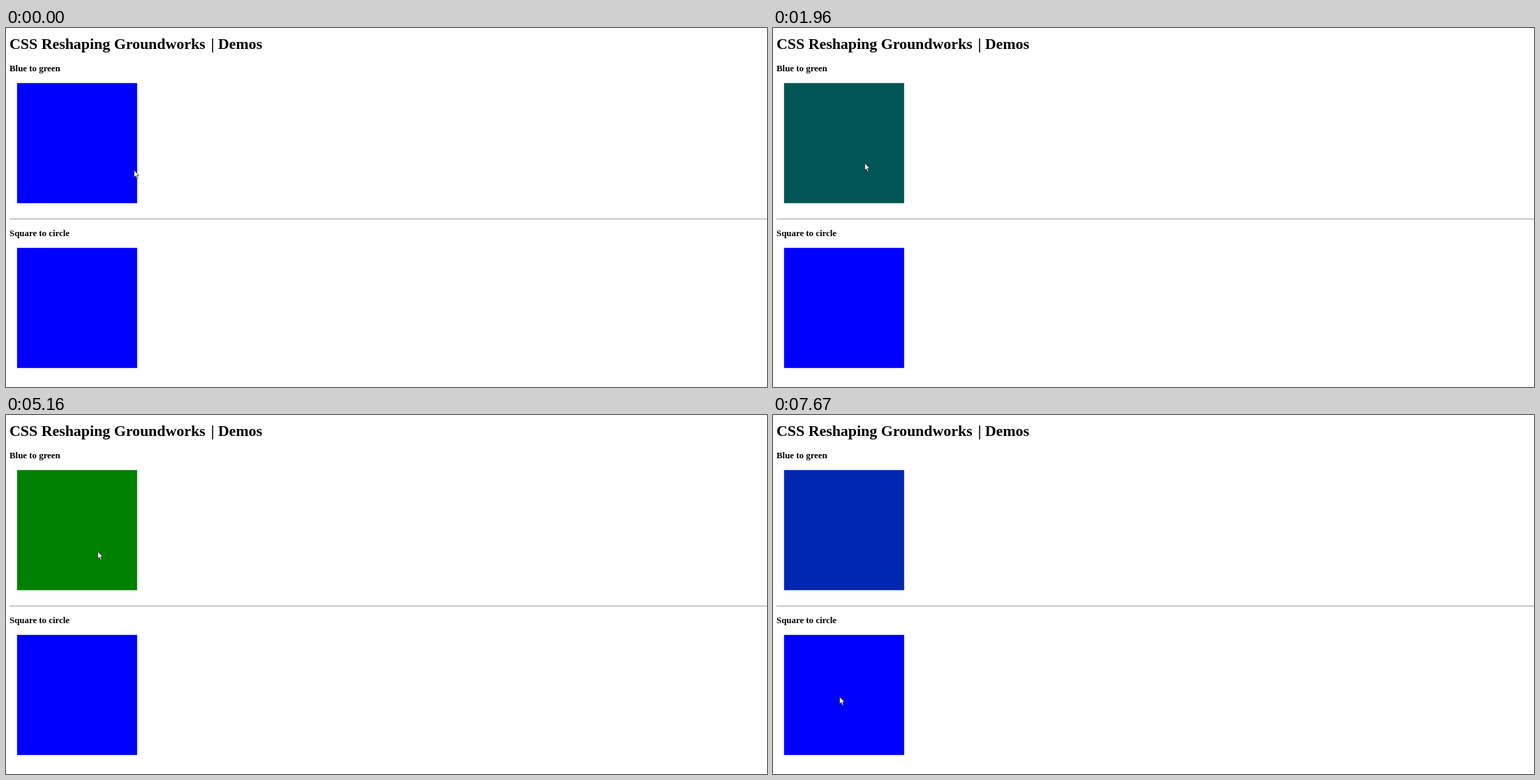
These frames come from a looping animation (1090x514 px, 7.99 s). An HTML page:

```html
<!DOCTYPE html>
<html lang="en">
<head>
<meta charset="utf-8">
<title>Transition demos</title>
<style>
  html, body { margin: 0; width: 100%; height: 100%; overflow: hidden; background: #fff; }
  svg { display: block; }
  text { font: bold 12.88px "Liberation Serif", "Times New Roman", serif; }
  .title { font-size: 21.9px; }
</style>
</head>
<body>
<svg width="1090" height="514">
  <text class="title" x="5" y="30">CSS Reshaping Groundworks</text>
  <text class="title" x="293.4" y="30">| Demos</text>
  <text x="5" y="62">Blue to green</text>
  <rect id="box" x="15.8" y="78.8" width="172" height="172" fill="#00f"/>
  <rect x="5" y="273" width="1085" height="1" fill="#9a9a9a"/>
  <text x="5" y="298">Square to circle</text>
  <rect x="15.8" y="314.8" width="172" height="172" fill="#00f"/>
  <path id="cursor" d="M.4 .6V10.8L2.7 8.7 4.4 12.6 6.1 11.9 4.4 8H7.6Z" fill="#fff" stroke="#222" stroke-width=".8"/>
</svg>
<script>
const LOOP = 7990, STEP = 70;
const box = document.getElementById('box');
const cursor = document.getElementById('cursor');

// Pointer strokes, each spread evenly over a few steps
const strokes = [
  { at: 70, steps: 1, dx: -1, dy: -5 },
  { at: 300, steps: 2, dx: -51, dy: -5 },
  { at: 5160, steps: 2, dx: 0, dy: 4 },
  { at: 5550, steps: 4, dx: -30, dy: 289 },
  { at: 6170, steps: 3, dx: -6, dy: -83 }
];

const clamp = v => Math.min(1, Math.max(0, v));

// CSS "ease": cubic-bezier(.25, .1, .25, 1)
function ease(x) {
  let lo = 0, hi = 1;
  for (let i = 0; i < 24; i++) {
    const s = (lo + hi) / 2;
    if (.75 * s * (1 - s) + s ** 3 < x) lo = s; else hi = s;
  }
  return .3 * lo * (1 - lo) ** 2 + 3 * lo * lo * (1 - lo) + lo ** 3;
}

// Eased progress shown in a limited number of shades
const fade = (x, shades) => Math.floor(shades * ease(clamp(x)) + .3) / shades;

function pointer(t) {
  let x = 183, y = 203;
  for (const { at, steps, dx, dy } of strokes) {
    const p = clamp((Math.floor((t - at) / STEP) + 1) / steps);
    x += dx * p;
    y += dy * p;
  }
  return [Math.round(x), Math.round(y)];
}

function draw(t) {
  const green = fade((t - 130) / 4500, 12) - fade((t - 5605) / 4950, 13);
  box.setAttribute('fill', `rgb(0,${Math.round(128 * green)},${Math.round(255 * (1 - green))})`);
  cursor.setAttribute('transform', `translate(${pointer(t)})`);
}

const start = performance.now();
function tick() {
  draw((performance.now() - start) % LOOP);
  requestAnimationFrame(tick);
}
tick();
</script>
</body>
</html>
```
